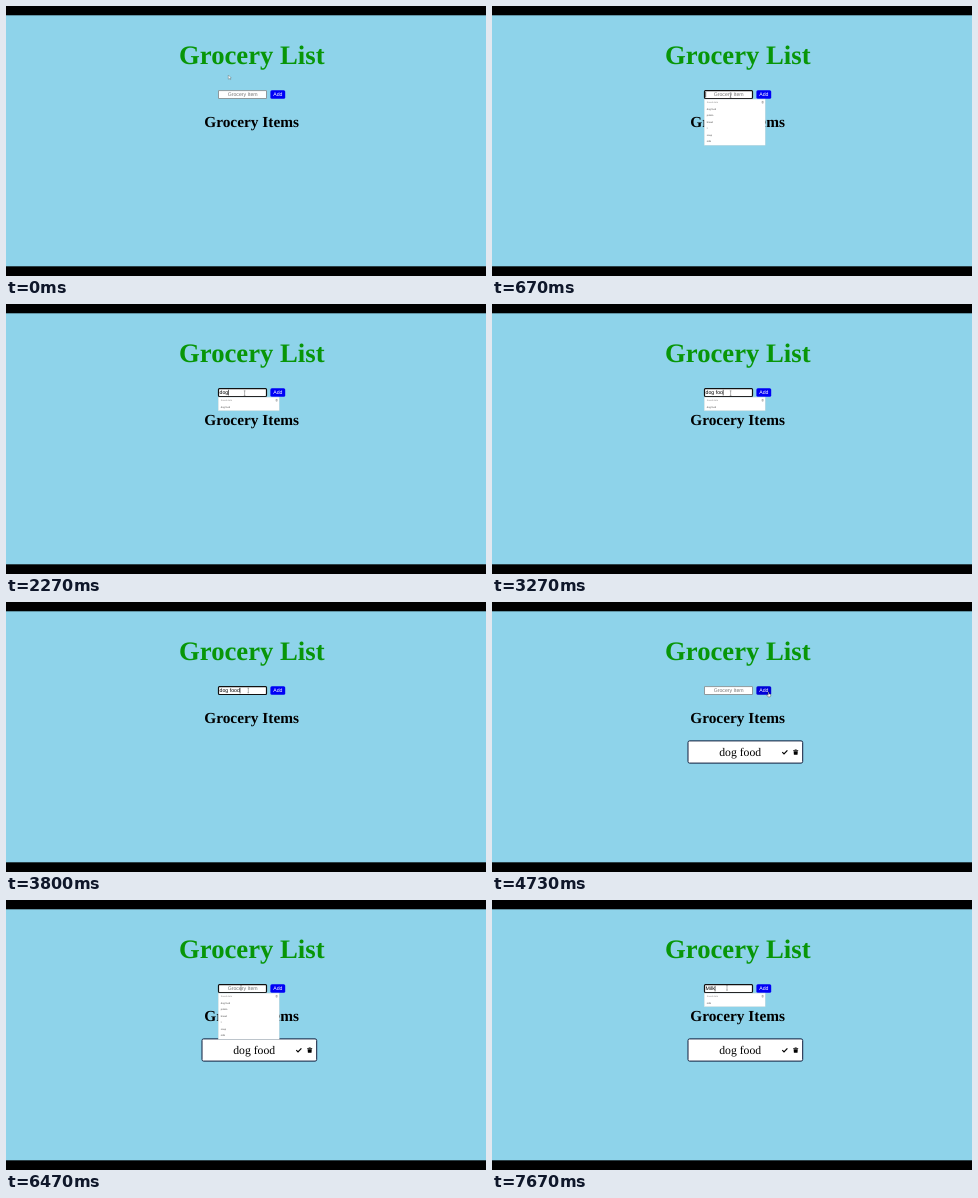
These frames come from a looping animation (480x270 px, 8000 ms). An HTML page:

```html
<!DOCTYPE html>
<html lang="en">
<head>
<meta charset="utf-8">
<title>Grocery List</title>
<style>
html, body { margin: 0; width: 100%; height: 100%; overflow: hidden; background: #000; }
svg { display: block; width: 480px; height: 270px; }
text { text-rendering: geometricPrecision; white-space: pre; }
.serif { font-family: "Liberation Serif", "Times New Roman", serif; text-anchor: middle; }
.sans { font-family: "Liberation Sans", Arial, sans-serif; font-size: 5.2px; }
.mid { text-anchor: middle; }
.tiny { font-size: 2.4px; fill: #444; }
</style>
</head>
<body>
<svg viewBox="0 0 480 270">
  <rect width="480" height="270" fill="#000"/>
  <rect y="9.3" width="480" height="251" fill="#8ed3ea"/>
  <text class="serif" x="245.8" y="58.3" font-size="26.7" font-weight="bold" fill="#089608">Grocery List</text>
  <text class="serif" x="245.6" y="121.3" font-size="15.35" font-weight="bold">Grocery Items</text>

  <rect id="field" x="212.5" y="84.6" width="48" height="7.9" fill="#fff"/>
  <text id="hint" class="sans mid" x="236.7" y="90.3" fill="#757575">Grocery Item</text>
  <text id="typed" class="sans" x="213.6" y="90.3"></text>
  <rect id="caret" y="85.8" width=".6" height="5.6"/>

  <rect id="button" x="264.4" y="84.3" width="14.8" height="8.5" rx="1.5" fill="#0000f5"/>
  <text class="sans mid" x="271.8" y="90.4" fill="#fff">Add</text>

  <g id="item">
    <rect x="196" y="138.9" width="114.7" height="22.2" rx="1.6" fill="#fff" stroke="#101c3c"/>
    <text class="serif" x="248.2" y="154" font-size="11.7">dog food</text>
    <path d="M290.3 150.2l1.7 1.7 3.4-3.6" fill="none" stroke="#000" stroke-width="1.2"/>
    <path d="M301.2 148h5v.8h-5zM302.7 147.4h2v.7h-2zM301.6 149.2h4.2l-.3 3.6h-3.6z"/>
  </g>

  <g id="menu">
    <rect id="sheet" x="212.2" y="93.1" width="61" fill="#fff" stroke="#c9d4d8" stroke-width=".4"/>
    <text class="sans" x="214.8" y="97" font-size="2.2" style="font-size:2.2px" fill="#888">Saved data</text>
    <path d="M269.7 95.4h1.8M270 95.8h1.2v1.4h-1.2z" fill="none" stroke="#777" stroke-width=".4"/>
    <g id="rows"></g>
  </g>

  <g id="pointer">
    <path id="arrow" d="M0 0v4.2l1-.9.7 1.5.7-.3-.7-1.5h1.3z" fill="#fff" stroke="#455" stroke-width=".35"/>
    <path id="beam" d="M-.8-2.4h1.6M0-2.4v4.8M-.8 2.4h1.6" fill="none" stroke="#666" stroke-width=".5"/>
    <path id="hand" d="M-.4 0h.8v1.8l1.7.5v1.4l-.6 1.2h-2l-1.4-2 .5-.4 1 .7z" fill="#fff" stroke="#111" stroke-width=".35"/>
  </g>
</svg>
<script>
const LOOP = 8000, BLINK = 530;
const $ = id => document.getElementById(id);
const show = (id, on) => $(id).setAttribute("display", on ? "inline" : "none");
const set = (id, attrs) => {
  for (const k in attrs) $(id).setAttribute(k, attrs[k]);
};

const saved = ["dog food", "potato", "bread", "t", "soap", "milk"];
const firstKeys = [1930, 2070, 2270, 2670, 2870, 3070, 3200, 3400];
const secondKeys = [6870, 7200, 7470, 7670];

// time, x, y
const path = [
  [0, 222.3, 69], [70, 222.3, 69], [530, 238.6, 89.2], [3670, 238.6, 89.2],
  [3800, 242.3, 88.4], [4330, 276.6, 90], [5400, 276.6, 90],
  [5900, 240, 88.6], [6130, 235, 87.8], [LOOP, 235, 87.8]
];

function pointerAt(t) {
  let i = 1;
  while (i < path.length - 1 && t >= path[i][0]) i++;
  const [t0, x0, y0] = path[i - 1], [t1, x1, y1] = path[i];
  const p = (t - t0) / (t1 - t0), e = p * p * (3 - 2 * p);
  return [x0 + (x1 - x0) * e, y0 + (y1 - y0) * e];
}

function drawMenu(prefix) {
  const list = saved.filter(s => s.startsWith(prefix.toLowerCase()));
  $("sheet").setAttribute("height", 7.1 + list.length * 6.5);
  $("rows").innerHTML = list.map((s, i) =>
    `<text class="sans tiny" x="214.8" y="${103.7 + i * 6.45}">${s}</text>`).join("");
}

function draw(t) {
  const second = t >= 4730;
  const keys = second ? secondKeys : firstKeys;
  const start = second ? 5930 : 670;
  const pressed = keys.filter(k => t >= k);
  const text = (second ? "Milk" : "dog food").slice(0, pressed.length);
  const focus = t >= start && !(t >= 4470 && t < 5930);

  set("field", {
    stroke: focus ? "#111" : "#777",
    "stroke-width": focus ? 1.2 : .7,
    rx: focus ? .9 : .2
  });
  show("hint", !text);
  $("typed").textContent = text;

  const since = t - (pressed.length ? pressed[pressed.length - 1] : start);
  show("caret", focus && Math.floor(since / BLINK) % 2 === 0);
  const width = text ? $("typed").getComputedTextLength() : 0;
  $("caret").setAttribute("x", 213.5 + width);

  const open = focus && text !== "dog food";
  show("menu", open);
  if (open) drawMenu(text);
  show("item", second);

  const [x, y] = pointerAt(t);
  const overRow = y > 84 && y < 93;
  const inField = overRow && x > 212 && x < 261;
  const onButton = overRow && x > 264 && x < 279;
  $("pointer").setAttribute("transform", `translate(${x} ${y})`);
  show("beam", inField);
  show("hand", onButton);
  show("arrow", !inField && !onButton);
  $("button").setAttribute("fill", onButton ? "#0000d8" : "#0000f5");
}

const begin = performance.now();
function tick() {
  draw((performance.now() - begin) % LOOP);
  requestAnimationFrame(tick);
}
tick();
</script>
</body>
</html>
```
